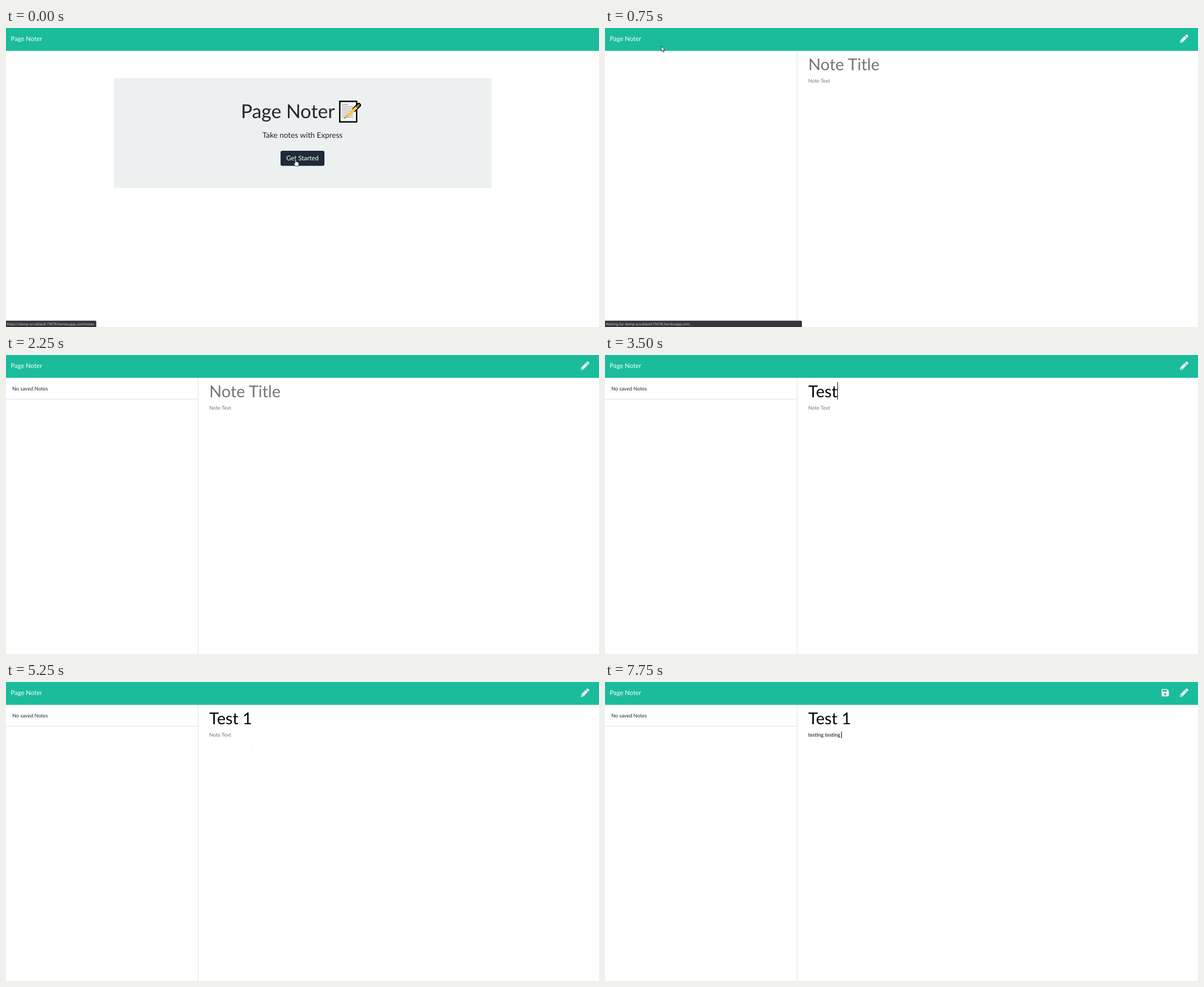
An HTML page with a canvas that plays this animation: 1054 px wide and 531 px high, repeating every 8 s.

```html
<!DOCTYPE html>
<html lang="en">
<head>
<meta charset="utf-8">
<title>Page Noter</title>
<style>
  html, body { margin: 0; width: 100%; height: 100%; overflow: hidden; background: #fff; }
  canvas { display: block; width: 100%; height: 100%; }
</style>
</head>
<body>
<canvas id="stage" width="1054" height="531"></canvas>
<script>
const ctx = document.getElementById('stage').getContext('2d');
const LOOP = 8000;
const APP = 'Page Noter';
const HOST = 'damp-scrubland-79078.herokuapp.com';
const TEAL = '#1abc9c', LIGHT = '#ecf0f1', HINT = '#757575';
const LEFT = 361.3;

// Each track lists [start time, value]; values hold until the next entry.
const tracks = {
  cursor: [[0, ['hand', 511, 233]], [500, ['hand', 493.5, 228.5]], [750, ['arrow', 99.6, 31.6]],
    [1000, ['arrow', 328.6, 30]], [1250, ['beam', 414, 65, 0.7]], [1500, null],
    [4750, ['beam', 435, 113, 0.3]]],
  title: [[0, ''], [2750, 'Te'], [3000, 'Tes'], [3500, 'Test'], [3750, 'Test '], [4000, 'Test 1']],
  body: [[0, ''], [6000, 'te'], [6250, 'testi'], [6500, 'testing'], [6750, 'testing t'],
    [7000, 'testing test'], [7750, 'testing testing ']],
  caret: [[0, ''], [1750, 'title'], [2250, ''], [2750, 'title'], [4500, ''], [4750, 'body'],
    [5250, ''], [5750, 'body'], [7500, ''], [7750, 'body']]
};

function at(track, t) {
  let value = null;
  for (const [start, v] of track) if (t >= start) value = v;
  return value;
}

function rect(x, y, w, h, color) {
  ctx.fillStyle = color;
  ctx.fillRect(x, y, w, h);
}

function rounded(x, y, w, h, r, color) {
  ctx.fillStyle = color;
  ctx.beginPath();
  ctx.roundRect(x, y, w, h, r);
  ctx.fill();
}

function line(x1, y1, x2, y2, width, color, cap = 'butt') {
  ctx.strokeStyle = color;
  ctx.lineWidth = width;
  ctx.lineCap = cap;
  ctx.beginPath();
  ctx.moveTo(x1, y1);
  ctx.lineTo(x2, y2);
  ctx.stroke();
}

function text(str, x, y, size, color, align = 'left', family = 'Lato') {
  ctx.font = `${size}px "${family}", sans-serif`;
  ctx.textAlign = align;
  ctx.fillStyle = color;
  ctx.fillText(str, x, y);
}

function shape(path, x, y, scale, fill, stroke, width) {
  ctx.save();
  ctx.translate(x, y);
  ctx.scale(scale, scale);
  ctx.fillStyle = fill;
  ctx.fill(path, 'evenodd');
  if (stroke) {
    ctx.strokeStyle = stroke;
    ctx.lineWidth = width;
    ctx.lineJoin = 'round';
    ctx.stroke(path);
  }
  ctx.restore();
}

const PEN = new Path2D('M498 142L452 188Q443 196 435 188L324 77Q316 69 324 60L370 14Q404 -14 438 14' +
  'L498 74Q526 108 498 142ZM284 100L22 362L0 484Q0 512 28 512L150 490L412 228Q420 220 412 211' +
  'L301 100Q293 92 284 100ZM88 424H126V456L70 466L45 442L56 386H88Z');
const DISK = new Path2D('M48 0H314Q334 0 348 14L434 100Q448 114 448 134V400Q448 448 400 448H48' +
  'Q0 448 0 400V48Q0 0 48 0ZM64 76V148Q64 160 76 160H308Q320 160 320 148V76Q320 64 308 64H76' +
  'Q64 64 64 76ZM288 320A64 64 0 1 0 160 320A64 64 0 1 0 288 320Z');
const HAND = new Path2D('M2.8 8V1.5Q2.8 .4 3.8 .4T4.8 1.5V4.8Q5.6 4.2 6.3 5.1Q7.1 4.7 7.7 5.6' +
  'Q9.2 5.3 9.2 7V9.4Q9.2 10.8 8.3 12.4H3.6Q2.8 10.8 .7 8.5Q.1 7.4 1.1 7Q2 7 2.8 8Z');
const ARROW = new Path2D('M.4 .4V9.8L2.5 7.9L4 11.3L5.5 10.7L4 7.3H6.8Z');

function drawCursor(cursor) {
  if (!cursor) return;
  const [kind, x, y, alpha] = cursor;
  if (kind === 'hand') shape(HAND, x, y, 1, '#fff', '#111', 0.7);
  if (kind === 'arrow') shape(ARROW, x, y, 1, '#fff', '#111', 0.8);
  if (kind === 'beam') {
    ctx.globalAlpha = alpha;
    rect(x, y, 1, 9, '#ddd');
    ctx.globalAlpha = 1;
  }
}

function drawMemo() {
  rect(592, 129, 32.5, 39, '#050505');
  rect(594.5, 131.5, 27.5, 34, '#f3f3f3');
  for (let i = 0; i < 7; i++) {
    rect(597, 135.6 + i * 3.7, i ? 20 : 11, 1.2, '#a5a5a5');
  }
  line(619.5, 144.5, 627, 137, 8, '#050505', 'round');
  line(624, 140, 627, 137, 3.6, '#a9776b', 'round');
  line(623, 141, 607, 156, 5, '#fcc63f');
  ctx.fillStyle = '#dfa672';
  ctx.beginPath();
  ctx.moveTo(605.3, 154.2);
  ctx.lineTo(608.7, 157.8);
  ctx.lineTo(601.5, 160.5);
  ctx.fill();
  line(601.4, 160.6, 603, 159.2, 1.2, '#222');
}

function drawStatus(str, width) {
  rounded(-3, 519.8, width + 3, 16, 2, '#35363a');
  text(str, 1.6, 528.2, 6.2, '#d0d1d3', 'left', 'Noto Sans');
}

function drawHome(t) {
  rounded(191.5, 89.3, 671.5, 194.7, 3, LIGHT);
  text(APP, 417.4, 160.4, 33.9, '#212529');
  drawMemo();
  text('Take notes with Express', 527, 195.2, 13.6, '#212529', 'center');
  const pressed = t >= 250;
  if (pressed) rounded(486.2, 216.2, 81.6, 30.4, 4.5, 'rgba(44,62,80,.5)');
  rounded(488, 218, 78, 26.8, 3, '#1e2b37');
  text('Get Started', 527, 235.3, 11.4, '#fff', 'center');
  if (pressed) drawStatus(`Waiting for ${HOST}...`, 350);
  else drawStatus(`https://${HOST}/notes`, 160.5);
}

function drawField(str, hint, baseline, size, focused, top, height) {
  text(str || hint, LEFT, baseline, size, str ? '#000' : HINT);
  if (focused) {
    const x = Math.floor(LEFT + (str ? ctx.measureText(str).width : 0));
    rect(x, top, 1, height, '#000');
  }
}

function drawNotes(t) {
  rect(341, 41, 1, 490, '#dfe2e5');
  if (t >= 1000) {
    text('No saved Notes', 11.3, 62.7, 9.07, '#212529');
    rect(0, 78, 341, 1, '#dfdfdf');
  }
  const caret = at(tracks.caret, t);
  drawField(at(tracks.title, t), 'Note Title', 74.8, 29.03, caret === 'title', 48, 31);
  drawField(at(tracks.body, t), 'Note Text', 97.3, 9.07, caret === 'body', 88, 12);
  shape(PEN, 1021.8, 11.4, 15 / 512, LIGHT);
  if (t >= 6000) shape(DISK, 989.2, 12.4, 13 / 448, LIGHT);
  if (t < 1250) drawStatus(`Waiting for ${HOST}...`, 350);
}

function draw(t) {
  rect(0, 0, 1054, 531, '#fff');
  rect(0, 0, 1054, 40.6, TEAL);
  text(APP, 8.4, 23.4, 11.34, '#fff');
  if (t < 750) drawHome(t);
  else drawNotes(t);
  drawCursor(at(tracks.cursor, t));
}

ctx.fontKerning = 'normal';
ctx.textRendering = 'geometricPrecision';
const begin = performance.now();

function frame() {
  draw((performance.now() - begin) % LOOP);
  requestAnimationFrame(frame);
}
frame();
</script>
</body>
</html>
```
